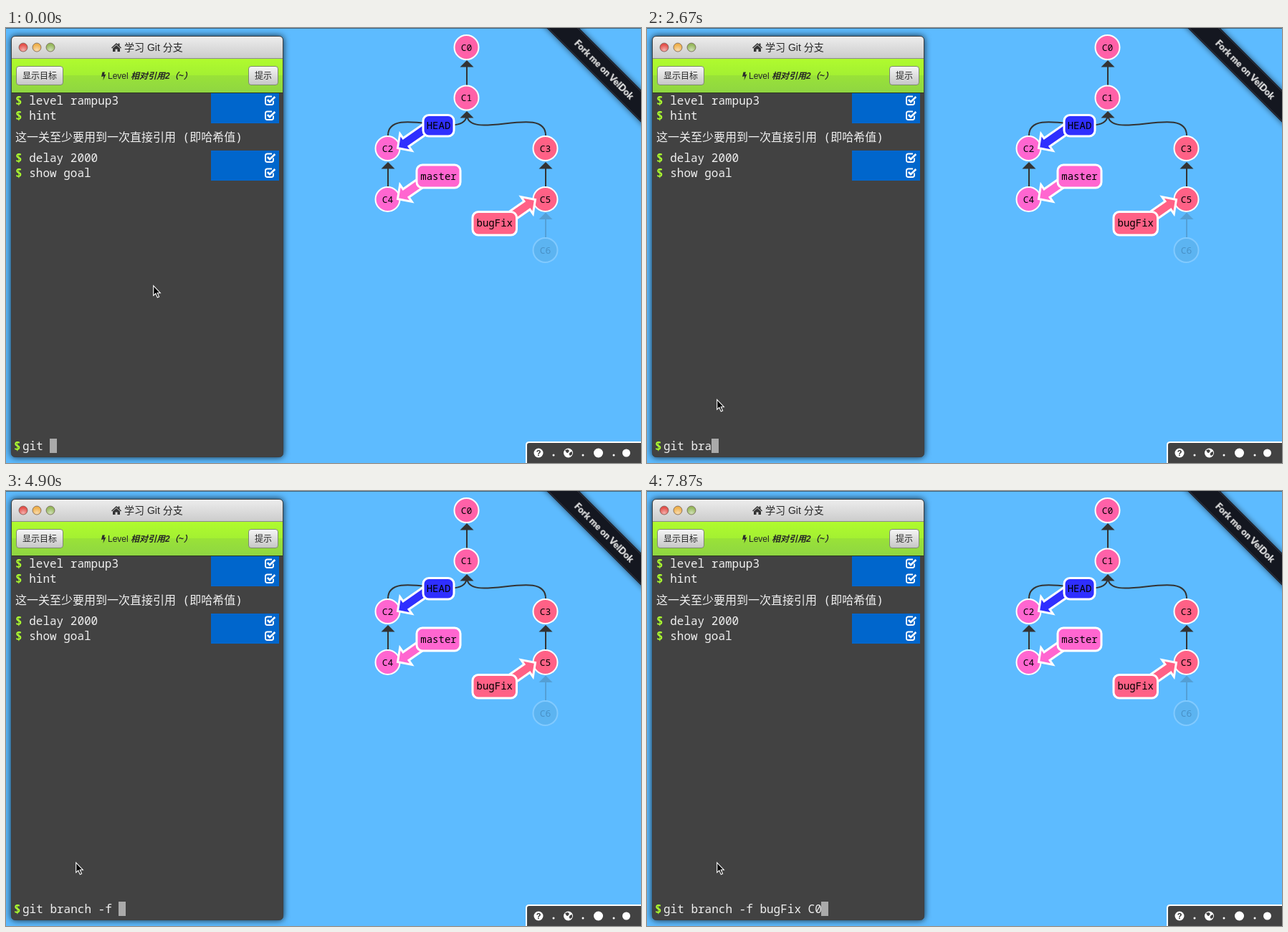
An HTML page that plays this animation: 886 by 607 pixels, repeating every 8 s.

```html
<!DOCTYPE html>
<html lang="zh-CN">
<head>
<meta charset="utf-8">
<title>学习 Git 分支</title>
<style>
  html, body { margin: 0; width: 100%; height: 100%; overflow: hidden; background: #5dbbff; }
  svg { display: block; width: 886px; height: 607px; }
  text { white-space: pre; }
  .mono { font-family: "Noto Sans Mono", "Noto Sans CJK SC", "Noto Sans CJK", monospace; }
  .term { font-size: 16px; font-weight: 500; fill: #f0f0f0; }
  .prompt { fill: #adff2f; font-weight: 600; }
  .ui { font-family: "Liberation Sans", "Noto Sans CJK SC", "Noto Sans CJK", sans-serif; font-size: 12px; fill: #262626; }
  .window { filter: drop-shadow(0 0 5px rgba(0, 0, 0, .8)); }
  .mid { text-anchor: middle; }
  .edge { fill: none; stroke: #333; stroke-width: 2; }
  .node circle { stroke: #fff; stroke-width: 2; }
  .node text { font-size: 13px; font-weight: 500; }
  .tag { stroke: #fff; stroke-width: 3; }
  .ref { font-size: 14px; font-weight: 500; }
  .ribbon { filter: drop-shadow(0 0 4px rgba(0, 0, 0, .6)); }
  .ribbon text { font: 900 13px Lato, sans-serif; fill: #e4e4e4; }
  #mouse { animation: hop 8s step-end infinite; }
  @keyframes hop {
    0% { transform: translate(205px, 359px); }
    3.625% { transform: translate(112px, 486px); }
    5.5%, 100% { transform: translate(97px, 518px); }
  }
</style>
</head>
<body>
<svg viewBox="0 0 886 607">
  <defs>
    <linearGradient id="title" x2="0" y2="1"><stop stop-color="#ededed"/><stop offset="1" stop-color="#cbcbcb"/></linearGradient>
    <linearGradient id="bar" x2="0" y2="1">
      <stop stop-color="#b0fb2e"/><stop offset=".5" stop-color="#a3f032"/>
      <stop offset=".5" stop-color="#99e238"/><stop offset="1" stop-color="#8fd642"/>
    </linearGradient>
    <linearGradient id="btn" x2="0" y2="1"><stop stop-color="#f6f6f6"/><stop offset="1" stop-color="#c6c6c6"/></linearGradient>
    <radialGradient id="shine" cy=".85" r=".7"><stop stop-color="#fff" stop-opacity=".55"/><stop offset="1" stop-color="#fff" stop-opacity="0"/></radialGradient>
    <g id="tick" fill="none" stroke="#fff">
      <path d="M12 7.5V10.5Q12 13 9.5 13H3.5Q1 13 1 10.5V4Q1 1.5 3.5 1.5H10" stroke-width="1.9"/>
      <path d="M3.8 6L7 9.2L14.3 2" stroke-width="2.6"/>
    </g>
    <g id="ticks">
      <rect width="95" height="42" fill="#0066cc"/>
      <use href="#tick" x="75" y="3"/><use href="#tick" x="75" y="24"/>
    </g>
    <path id="head" d="M0 0L9.5 9.5H-9.5Z" fill="#333"/>
    <path id="pointer" class="tag" d="M14 -.5L17.2 -20.4L21.5 -14.2L53.5 -36.5L61.5 -25L29.5 -2.8L33.8 3.4Z"/>
  </defs>

  <rect width="886" height="607" fill="#5dbbff"/>
  <rect width="886" height="1" fill="#41647c"/>

  <!-- terminal window -->
  <g class="window">
    <rect x="7.5" y="11.5" width="379" height="587" rx="5" fill="#424242" stroke="#3b3f43"/>
  </g>
  <path d="M8 43V17Q8 12 13 12H381Q386 12 386 17V43Z" fill="url(#title)"/>
  <rect x="8" y="42" width="378" height="1" fill="#8b8b8b"/>
  <rect x="8" y="43" width="378" height="47" fill="url(#bar)"/>
  <rect x="8" y="90" width="378" height="1" fill="#2e3a1c"/>
  <g id="lights"></g>
  <path d="M147 27.5L154 21L156.5 23.3V21.5H158.5V25.2L161 27.5L160 28.5L154 23L148 28.5ZM149 28.5L154 24L159 28.5V33H155.5V29.5H152.5V33H149Z" fill="#333"/>
  <text class="ui" x="165" y="32" style="font-size:14px">学习 Git 分支</text>
  <g fill="url(#btn)" stroke="#7d8a6c">
    <rect x="14.5" y="53.5" width="65" height="26" rx="3.5"/>
    <rect x="338.5" y="53.5" width="41" height="26" rx="3.5"/>
  </g>
  <g class="mid" font-weight="500">
    <text class="ui" x="47" y="71">显示目标</text>
    <text class="ui" x="359" y="71">提示</text>
  </g>
  <path d="M134.5 61.5H138L136.7 65L139.5 64.5L135.5 73L136.2 67.3L133 68Z" fill="#2b2b2b"/>
  <text class="ui" x="142" y="71">Level <tspan font-weight="700" font-style="italic">相对引用2（~）</tspan></text>

  <use href="#ticks" x="286" y="91"/>
  <use href="#ticks" x="286" y="171"/>
  <g id="lines" class="mono term">
    <text x="13" y="158">这一关至少要用到一次直接引用 (即哈希值)</text>
    <text class="prompt" x="11" y="589">$</text>
    <text id="cmd" x="23" y="589">git </text>
  </g>
  <rect id="caret" x="61" y="573" width="10" height="20" fill="#aaa"/>

  <!-- commit tree -->
  <g class="edge">
    <path d="M643 80V50M533 221V192M753 221V192"/>
    <path d="M533 150C533 105 643 160 643 120"/>
    <path d="M753 150C753 105 643 160 643 120"/>
  </g>
  <use href="#head" x="643" y="45"/>
  <use href="#head" x="643" y="116"/>
  <use href="#head" x="533" y="187"/>
  <use href="#head" x="753" y="187"/>
  <g opacity=".2">
    <path class="edge" d="M753 292V264"/>
    <use href="#head" x="753" y="257.5"/>
  </g>
  <g id="nodes" class="mono mid"></g>
  <g id="refs" class="mono mid"></g>

  <!-- corner ribbon -->
  <g class="ribbon" transform="translate(832 55) rotate(45)">
    <rect x="-130" y="-16" width="260" height="32" fill="#141720"/>
    <path d="M-130 -14.5H130M-130 14.5H130" stroke="#8b93a0" stroke-opacity=".25"/>
    <text class="mid" x="4" y="5">Fork me on VelDok</text>
  </g>

  <!-- footer -->
  <path d="M726 609V582Q726 578 730 578H890V609Z" fill="#424242" stroke="#fff" stroke-width="2"/>
  <g fill="#fff">
    <circle cx="743" cy="593" r="6.5"/>
    <circle cx="784.5" cy="593" r="6.5"/>
    <circle cx="826.5" cy="593" r="6.5"/>
    <circle cx="865.5" cy="593" r="5.5"/>
    <circle cx="764" cy="596" r="1.5"/>
    <circle cx="805" cy="596" r="1.5"/>
    <circle cx="848" cy="596" r="1.5"/>
  </g>
  <text class="ui mid" x="743" y="597" font-weight="700" style="font-size:11px">?</text>
  <path d="M780 589L784 588L786 590L784 593L782 592.5ZM787 592L790 591V595L787 597L785.5 594.5Z" fill="#424242"/>

  <path id="mouse" d="M.7 .7V14.3L3.8 11.5L6.3 17L8.6 16L6.2 10.7H10.3Z" fill="#000" stroke="#fff" stroke-width="1.1"/>
</svg>
<script>
const LOOP = 8000, CHAR = 9.6, LEFT = 22.6;
const get = id => document.getElementById(id);
const add = (id, markup) => get(id).insertAdjacentHTML('beforeend', markup);

[['#e4504a', 24], ['#efb04c', 43], ['#96b85c', 62]].forEach(([fill, x]) => add('lights',
  `<circle cx="${x}" cy="27" r="6" fill="${fill}" stroke="#6b5a50" stroke-opacity=".75"/>
   <circle cx="${x}" cy="27" r="5.5" fill="url(#shine)"/>`));

[['level rampup3', 107], ['hint', 128], ['delay 2000', 187], ['show goal', 208]].forEach(([line, y]) => add('lines',
  `<text class="prompt" x="13" y="${y}">$</text><text x="32.2" y="${y}">${line}</text>`));

const rose = '#ff61a8', orchid = '#ff66d0', coral = '#ff6186';
[
  ['C0', 642.5, 27, rose], ['C1', 642.5, 97.5, rose], ['C2', 532.5, 168, orchid], ['C3', 752.5, 168, coral],
  ['C4', 532.5, 239, orchid], ['C5', 752.5, 239, coral], ['C6', 752.5, 310, '#5a9cc4', .22]
].forEach(([name, x, y, fill, alpha = 1]) => add('nodes',
  `<g class="node" opacity="${alpha}"><circle cx="${x}" cy="${y}" r="17" fill="${fill}"/>
   <text x="${x}" y="${y + 4.5}">${name}</text></g>`));

// name, commit centre, pointer angle, box, fill
[
  ['HEAD', 532.5, 168, 0, 582, 121.5, 43, 29.5, '#2f2fff'],
  ['master', 532.5, 239, 0, 573, 191, 61, 32, orchid],
  ['bugFix', 752.5, 239, 180, 651, 256.5, 61.5, 32.5, coral]
].forEach(([name, cx, cy, turn, x, y, w, h, fill]) => add('refs',
  `<use href="#pointer" fill="${fill}" transform="translate(${cx} ${cy}) rotate(${turn})"/>
   <rect class="tag" x="${x}" y="${y}" width="${w}" height="${h}" rx="8" fill="${fill}"/>
   <text class="ref" x="${x + w / 2}" y="${y + h / 2 + 4.5}">${name}</text>`));

// each key: time and text typed; '<' deletes one letter
const keys = [
  [1040, 'b'], [1180, 'h'], [1780, 'r'], [1930, '<'], [2070, '<'], [2220, 'r'], [2670, 'a'], [3120, 'n'],
  [3260, 'ch'], [4160, ' '], [4460, '-'], [4610, 'f'], [4900, ' '], [5500, 'bu'], [5650, 'g'], [5940, 'F'],
  [6090, 'i'], [6230, 'x'], [6830, ' '], [7130, 'C'], [7870, '0']
];
const typed = t => keys.reduce((s, [at, k]) => t < at ? s : k === '<' ? s.slice(0, -1) : s + k, 'git ');

const hop = get('mouse').getAnimations()[0];
hop.pause();

function draw(now) {
  const t = now % LOOP, line = typed(t);
  if (get('cmd').textContent !== line) get('cmd').textContent = line;
  get('caret').setAttribute('x', Math.round(LEFT + CHAR * line.length));
  hop.currentTime = t;
  requestAnimationFrame(draw);
}
draw(0);
</script>
</body>
</html>
```
